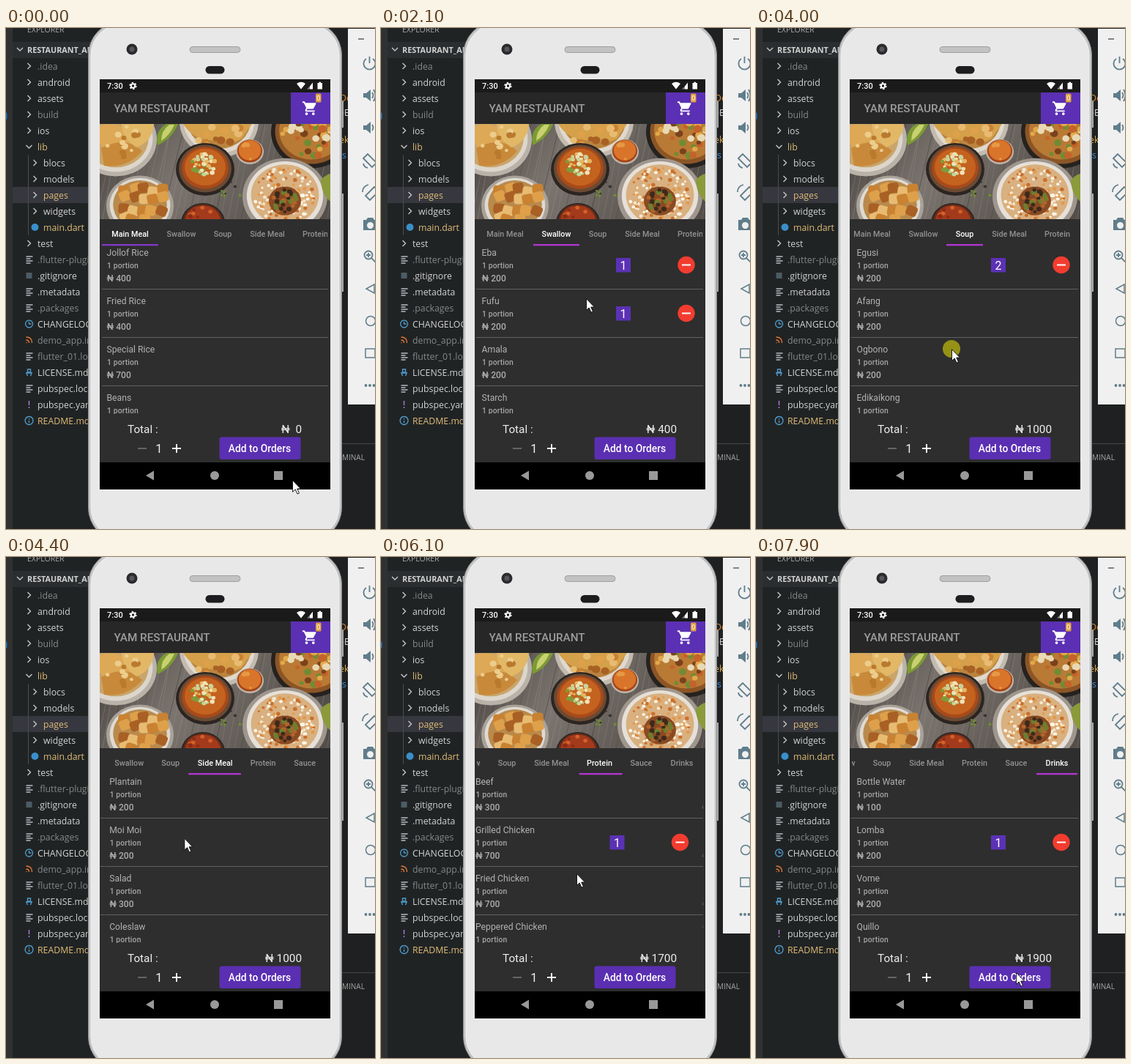
Write an HTML page that moves like this. It is 504x684 px and loops after 8000 ms.

```html
<!DOCTYPE html>
<html lang="en">
<head>
<meta charset="utf-8">
<title>Restaurant app demo</title>
<style>
html, body { margin: 0; width: 100%; height: 100%; overflow: hidden; background: #1e2021; }
svg { display: block; width: 504px; height: 684px; }
text { font-family: Roboto, Arial, sans-serif; white-space: pre; }
.side text { font: 12.3px "Open Sans", "Noto Sans", sans-serif; }
.tabs text { font-size: 10.8px; font-weight: 500; text-anchor: middle; }
.name { font-size: 12.2px; fill: #b2b2b2; }
.portion { font-size: 10.4px; font-weight: 500; letter-spacing: .1px; fill: #a6a6a6; }
.price { font-size: 12.1px; font-weight: 500; fill: #acacac; }
.badge { font-size: 16px; fill: #fff; text-anchor: middle; }
.bar { font-size: 15.3px; fill: #eee; }
.tools { fill: none; stroke: #607d8b; stroke-width: 1.8; }
.tools .fill { fill: #607d8b; stroke: none; }
</style>
</head>
<body>
<svg viewBox="0 0 504 684">
  <defs>
    <clipPath id="photoClip"><path d="M128 131h315v130H128z"/></clipPath>
    <clipPath id="tabClip"><path d="M131 262h308v37H131z"/></clipPath>
    <clipPath id="listClip"><path d="M129 299h311v228H129z"/></clipPath>
    <linearGradient id="wood" x2="1" y2=".25">
      <stop stop-color="#46413e"/><stop offset=".45" stop-color="#7c756f"/><stop offset="1" stop-color="#544e4a"/>
    </linearGradient>
  </defs>

  <!-- editor -->
  <rect width="504" height="684" fill="#1e2021"/>
  <rect x="9" width="110" height="684" fill="#202324"/>
  <rect width="9" height="684" fill="#303131"/>
  <path d="M0 115a1.500 5 0 0 1 0 10" fill="#1f78c8"/>
  <rect x="9" y="19" width="110" height="22" fill="#2b2e30"/>
  <rect x="9" y="217" width="110" height="22" fill="#37373f"/>
  <path d="M30.500 173v110" stroke="#4b4d4e"/>
  <g id="side" class="side"></g>
  <g class="side">
    <text x="456" y="100" fill="#d98b3a">De</text>
    <text x="455" y="120" fill="#ddd">eE</text>
    <text x="455" y="157" fill="#e0b050">ek</text>
    <text x="459" y="178" fill="#3f8fd8">s</text>
    <path d="M456 567.500h48" stroke="#454748"/>
    <text x="459" y="590" fill="#a5a5a5" style="font-size:10px">MINAL</text>
  </g>

  <!-- emulator toolbar -->
  <path d="M467 1h37v513h-37z" fill="#f0f0f0"/>
  <g class="tools">
    <path d="M481 15h8" stroke="#777"/>
    <path d="M492 42a8 8 0 1 0 9 0M496.500 39v9"/>
    <path class="fill" d="M488 89h4l6-5v16l-6-5h-4zM488 133h4l6-5v16l-6-5h-4z"/>
    <path d="M500 88q3 4 0 8M502 84q5 8 0 16M500 132q3 4 0 8"/>
    <path d="M488 178l6-6 12 12-6 6zM488 185q1 5 6 6M503 217l-12 12 6 6 12-12zM487 224q0-8 8-10"/>
    <path class="fill" fill-rule="evenodd" d="M488 262h4l2-3h7l2 3h3v14h-18zM497.500 265a4.500 4.500 0 1 0 .1 0z"/>
    <circle cx="495" cy="310" r="5.500"/><path d="M499 314l6 6M492 310h6M495 307v6"/>
    <g stroke-width="1.500">
      <path d="M503 350v12l-11-6zM491 438h13v12h-13z"/><circle cx="498" cy="400" r="6.500"/>
    </g>
    <path d="M491.500 488h12" stroke-width="3.800" stroke-linecap="round" stroke-dasharray="0 5.500"/>
  </g>

  <!-- phone -->
  <path d="M457 100h4v36h-4zM457 226h4v134h-4z" fill="#aaa"/>
  <rect x="112.500" y="-9" width="346" height="710" rx="46" fill="#c4c4c4" stroke="#8e8e8e"/>
  <rect x="116" y="-5.500" width="339" height="703" rx="43" fill="#e9e8e8" stroke="#f2f2f2"/>
  <circle cx="172" cy="29" r="7.500" fill="#2b2b2d"/><circle cx="172" cy="29" r="3.500" fill="#55575c"/>
  <rect x="251" y="25.500" width="69" height="8" rx="4" fill="#c2c2c2" stroke="#9f9f9f"/>
  <rect x="272.500" y="52" width="26" height="10.500" rx="5.200" fill="#1d1d1f"/>
  <rect x="128" y="70" width="315" height="560" fill="#2e2e2e"/>
  <rect x="128" y="70" width="315" height="18" fill="#1a1a1a"/>
  <rect x="128" y="88" width="315" height="43" fill="#272727"/>
  <text x="138" y="83" font-size="11" font-weight="500" fill="#fff">7:30</text>
  <circle cx="173.500" cy="79" r="2.700" fill="none" stroke="#fff" stroke-width="2"/>
  <circle cx="173.500" cy="79" r="4.400" fill="none" stroke="#fff" stroke-width="1.500" stroke-dasharray="2.300"/>
  <path d="M397 76q6-4.500 12 0l-6 7.500zM419 74.500v9h-4v-4zM425.500 75h2v-1.200h2.500V75h2v8.500h-6.500z" fill="#fff"/>
  <path d="M411 83.500l4-4v4z" fill="#888"/>
  <text x="147.500" y="115" font-size="15.300" font-weight="500" fill="#9c9c9c">YAM RESTAURANT</text>
  <rect x="389" y="88" width="54" height="43" fill="#5b30b4"/>
  <path transform="translate(404 98.500) scale(.93)" fill="#fff" d="M7 18a2 2 0 1 0 .01 0zM1 2v2h2l3.600 7.600-1.350 2.450A2 2 0 0 0 7 17h12v-2H7.420q-.3-.1-.2-.4l.9-1.600h7.450a2 2 0 0 0 1.750-1l3.580-6.500A1 1 0 0 0 20 4H5.210l-.94-2zM17 18a2 2 0 1 0 .01 0z"/>
  <rect x="423" y="89.500" width="7.500" height="12" rx="1.500" fill="#e0a040"/>
  <text x="426.700" y="99" font-size="9" fill="#fff" text-anchor="middle">0</text>

  <g id="photo" clip-path="url(#photoClip)"></g>
  <g class="tabs" clip-path="url(#tabClip)"><g id="tabs"><rect id="line" y="295" height="2.300"/></g></g>
  <g clip-path="url(#listClip)"><g id="pages"></g></g>

  <text class="bar" x="166" y="552.500">Total :</text>
  <text class="bar" id="total" x="404" y="552.500" text-anchor="end"></text>
  <path d="M180 574h12" stroke="#777" stroke-width="1.500"/>
  <text x="209" y="579.500" font-size="16.500" fill="#f2f2f2" text-anchor="middle">1</text>
  <path d="M227 574h12M233 568v12" stroke="#fff" stroke-width="1.800"/>
  <rect x="291.500" y="558.500" width="111" height="30.500" rx="3" fill="#5a2fb2"/>
  <text x="346.500" y="579" font-size="13.800" font-weight="500" fill="#fff" text-anchor="middle">Add to Orders</text>
  <rect x="128" y="593" width="315" height="37" fill="#000"/>
  <path d="M202 604.500v13l-11-6.500zM366 605h12v12h-12z" fill="#999"/>
  <circle cx="285" cy="611" r="6" fill="#999"/>

  <g id="cursor">
    <circle id="press" r="12" fill="#a29d14" opacity=".9"/>
    <path transform="scale(1.05)" d="M.5.6v15l3.500-3.300 2.600 5.900 2.400-1-2.600-5.700h4.500z" fill="#fff" stroke="#111" stroke-width=".9"/>
  </g>
</svg>
<script>
const $ = id => document.getElementById(id);
function el(parent, tag, attrs, text) {
  const node = document.createElementNS('http://www.w3.org/2000/svg', tag);
  for (const k in attrs) node.setAttribute(k, attrs[k]);
  if (text) node.textContent = text;
  parent.appendChild(node);
  return node;
}

// ---- file tree: name, icon, colour, depth
const grey = '#858788', pale = '#d2d2d2', gold = '#dfbd78', blue = '#4f9ac9';
const files = [
  ['.idea', 'dir', grey], ['android', 'dir'], ['assets', 'dir'], ['build', 'dir', grey],
  ['ios', 'dir'], ['lib', 'open', gold], ['blocs', 'dir', pale, 1], ['models', 'dir', pale, 1],
  ['pages', 'dir', gold, 1], ['widgets', 'dir', pale, 1], ['main.dart', 'dart', gold, 1], ['test', 'dir'],
  ['.flutter-plugins', 'lines', grey], ['.gitignore', 'git'], ['.metadata', 'lines'],
  ['.packages', 'lines', grey], ['CHANGELOG.md', 'clock'], ['demo_app.iml', 'feed', grey],
  ['flutter_01.log', 'lines', grey], ['LICENSE.md', 'ribbon'], ['pubspec.lock', 'lines'],
  ['pubspec.yaml', 'bang'], ['README.md', 'info', gold]
];
const icons = {
  dir: ['M-2-4l4 4-4 4', '#c5c5c5'], open: ['M-4-2l4 4 4-4', '#c5c5c5'],
  lines: ['M-4-4h9M-4-1h6M-4 2h9M-4 5h6', '#b5bcc0'],
  clock: ['M0-5a5 5 0 1 0 .1 0M0-3v3h3', blue],
  feed: ['M-4-4q8 0 8 8M-4 0q4 0 4 4M-4 3.500h1', '#e37933'],
  ribbon: ['M-2-4h4v4h-4zM-4 0l2 5M4 0l-2 5M-4 1h8', blue],
  bang: ['M0-5v6M0 3v2', '#b07ad8'],
  info: ['M0-5.500a5.500 5.500 0 1 0 .1 0M0-3v1.500M0 0v3', blue]
};
const side = $('side');
function icon(kind, x, y) {
  if (kind === 'dart') return el(side, 'circle', { cx: x, cy: y, r: 5, fill: '#3a8fc9' });
  if (kind === 'git') return el(side, 'rect', { x: x - 4, y: y - 4, width: 8, height: 8, fill: '#4d5c64' });
  const [d, stroke] = icons[kind];
  el(side, 'path', { d, stroke, fill: 'none', 'stroke-width': 1.4, transform: `translate(${x} ${y})` });
}
el(side, 'text', { x: 29, y: 6, fill: '#a9a9a9', style: 'font-size:10.5px' }, 'EXPLORER');
el(side, 'text', { x: 29, y: 34, fill: '#d4d4d4', style: 'font-size:10.8px;font-weight:700' }, 'RESTAURANT_APP');
icon('open', 19, 29);
files.forEach(([name, kind, fill = pale, deep = 0], i) => {
  const y = 52 + i * 22;
  icon(kind, 31.5 + deep * 8, y);
  el(side, 'text', { x: 43 + deep * 8, y: y + 4.5, fill }, name);
});

// ---- food photo in flat shapes
const photo = $('photo');
let seed = 7;
const rnd = () => (seed = seed * 16807 % 2147483647) / 2147483647;
const disc = (cx, cy, r, fill) => el(photo, 'ellipse', { cx, cy, rx: r, ry: r * .9, fill });
const shape = (d, fill) => el(photo, 'path', { d, fill });
function scatter(x, y, r, n, size, colors) {
  for (let i = 0; i < n; i++) {
    const a = rnd() * 6.283, q = r * Math.sqrt(rnd());
    disc(x + q * Math.cos(a), y + q * .9 * Math.sin(a), size * (.6 + rnd() * .6), colors[i % colors.length]);
  }
}
// rings run from the rim inwards, each a little smaller
function dish(x, y, r, rings, n, size, colors) {
  rings.forEach((c, i) => disc(x, y - i, r * (1 - i * .1), c));
  scatter(x, y - 2, r * .72, n, size, colors);
}
shape('M128 131h315v130H128z', 'url(#wood)');
for (let i = 0; i < 40; i++)
  el(photo, 'path', { d: `M${105 + i * 9} 261l${20 + rnd() * 12}-130`, stroke: i % 4 ? '#99928b' : '#2f2b29', opacity: .2 + rnd() * .3 });
const fried = ['#c98231', '#dea04a', '#a96024', '#e8bb72'];
dish(150, 152, 56, ['#b9b2a8', '#dcd6cc', '#c9a56c'], 0);
shape('M128 134q28-10 50 18l-26 16q-18-2-24-10z', '#dda957');
shape('M130 164q34-18 56 4-20 24-52 20z', '#c88a3a');
shape('M158 131h44q-2 24-24 32-20-14-20-32z', '#e2b867');
scatter(158, 156, 26, 14, 4, ['#edcd8d', '#b97a2e']);
shape('M207 160q-4-20 12-29h16q-8 20-28 29z', '#7c9a34');
shape('M212 154q0-14 11-22h7q-6 14-18 22z', '#c9d070');
dish(291, 128, 54, ['#c3bbb0', '#e0d9cd', '#b98440'], 0);
shape('M242 131h94l-14 20q-16 10-30 2-34 4-50-22z', '#d5a04a');
scatter(288, 138, 32, 16, 5, fried);
dish(417, 142, 55, ['#25221f', '#8b5526', '#b97a35'], 60, 5, ['#e2a94a', '#c4622a', '#e8d9b4', '#6f8c34', '#7a421c']);
dish(333, 169, 19, ['#bfb6ab', '#a54418', '#d9752a'], 4, 3, ['#e59a45']);
dish(272, 193, 40, ['#2b2522', '#6b4a33', '#a84a1a', '#c4621f'], 0);
scatter(270, 187, 17, 46, 2.8, ['#efe2b8', '#7f9b3a', '#e4b660', '#c9d39a']);
dish(183, 243, 46, ['#a9a299', '#dfdad2', '#b98a4c'], 0);
for (let i = 0; i < 18; i++) {
  const x = 152 + i % 5 * 13 + rnd() * 5, y = 212 + (i / 5 | 0) * 13 + rnd() * 4;
  el(photo, 'rect', { x, y, width: 15, height: 14, rx: 4, fill: fried[i % 4], transform: `rotate(${rnd() * 50 - 25} ${x} ${y})` });
}
dish(269, 266, 30, ['#2d2825', '#6b2c18', '#a43a1c'], 14, 3, ['#d2622a', '#8b2c16']);
dish(381, 230, 58, ['#9f978e', '#e6e0d8', '#d9b080'], 150, 2.4, ['#f4e6cf', '#e39a4d', '#fff6e6', '#c9702e']);
disc(381, 236, 22, '#8a4a22');
scatter(381, 236, 18, 34, 3.4, ['#3d2a1c', '#b2642c', '#6d7f30']);
scatter(310, 222, 18, 9, 2, ['#6f8c34', '#3b332c']);
shape('M430 207q9-8 13-8v38q-12-10-13-30z', '#8b9a3a');

// ---- menu pages; each name carries its price
const menu = [
  ['Main Meal', 'Jollof Rice 400', 'Fried Rice 400', 'Special Rice 700', 'Beans 300'],
  ['Swallow', 'Eba 200', 'Fufu 200', 'Amala 200', 'Starch 200'],
  ['Soup', 'Egusi 200', 'Afang 200', 'Ogbono 200', 'Edikaikong 200'],
  ['Side Meal', 'Plantain 200', 'Moi Moi 200', 'Salad 300', 'Coleslaw 300'],
  ['Protein', 'Beef 300', 'Grilled Chicken 700', 'Fried Chicken 700', 'Peppered Chicken 700'],
  ['Sauce', 'Pepper Sauce 200', 'Egg Sauce 300', 'Fish Sauce 300', 'Garden Sauce 300'],
  ['Drinks', 'Bottle Water 100', 'Lomba 200', 'Vome 200', 'Quillo 200']
];
const edges = [131, 208, 271, 321, 393, 452, 507, 563];
const centers = menu.map((_, i) => (edges[i] + edges[i + 1]) / 2);
// the chosen tab is centred as far as the strip can scroll
const scrolls = centers.map(c => Math.min(Math.max(c - 285, 0), edges[7] - 439));
const pageW = 310, rowH = 66, dishes = {}, labels = [];

menu.forEach(([tab, ...items], p) => {
  labels.push(el($('tabs'), 'text', { x: centers[p], y: 284.5 }, tab));
  const page = el($('pages'), 'g', { transform: `translate(${p * pageW} 0)` });
  items.forEach((item, r) => {
    const row = el(page, 'g', { transform: `translate(0 ${r * rowH})` });
    const [, name, price] = item.match(/(.+) (\d+)/);
    el(row, 'text', { class: 'name', x: 137.5, y: 310.5 }, name);
    el(row, 'text', { class: 'portion', x: 138, y: 327.5 }, '1 portion');
    el(row, 'text', { class: 'price', x: 137.5, y: 345.5 }, '₦ ' + price);
    el(row, 'path', { d: 'M131 356.500h309.500', stroke: '#616161' });
    const mark = el(row, 'g');
    el(mark, 'rect', { x: 321, y: 314, width: 20, height: 19.5, fill: '#5b32b5' });
    const count = el(mark, 'text', { class: 'badge', x: 331, y: 329.5 });
    el(mark, 'circle', { cx: 417, cy: 323.5, r: 11.7, fill: '#f23c30' });
    el(mark, 'path', { d: 'M411 323.500h12', stroke: '#fff', 'stroke-width': 2 });
    dishes[name] = { mark, count, price: +price };
  });
});

// ---- timeline in ms
const loop = 8000, step = 100;
const tabTaps = [950, 4690], drags = [2700, 4080, 6098, 6550];
const orders = [[1600, 'Eba'], [2000, 'Fufu'], [2300, 'Fufu'], [3700, 'Egusi'], [3900, 'Egusi'], [5800, 'Grilled Chicken'], [7500, 'Lomba']];
// pointer stops: arrival, x, y
const stops = [
  [0, 391, 617], [200, 254, 348], [700, 240, 278], [1300, 285, 313], [1800, 280, 369],
  [2700, 300, 447], [2800, 228, 447], [3400, 262, 330], [4000, 267, 438], [4200, 190, 434],
  [4600, 350, 283], [5000, 320, 331], [5300, 292, 384], [6100, 267, 432], [6300, 190, 430],
  [6500, 278, 430], [7200, 276, 375], [7900, 355, 567]
];

// a move takes up to 300 ms and ends on its stop
function pointer(t) {
  const n = stops.findIndex(s => s[0] >= t);
  if (n < 1) return stops[n].slice(1);
  const [t0, x0, y0] = stops[n - 1], [t1, x1, y1] = stops[n];
  const u = Math.max(0, 1 - (t1 - t) / Math.min(300, t1 - t0));
  return [x0 + (x1 - x0) * u, y0 + (y1 - y0) * u];
}
// every turn glides one page on and settles exponentially
const pageAt = t => [...tabTaps, ...drags].reduce((p, s) => p + (t > s ? 1 - Math.exp((s - t) / 72) : 0), 0);

function draw(t) {
  const p = pageAt(t), lo = Math.floor(p), f = p - lo;
  const mix = list => list[lo] + ((list[lo + 1] ?? list[lo]) - list[lo]) * f;
  const left = mix(edges), right = mix(edges.slice(1));
  $('tabs').setAttribute('transform', `translate(${-mix(scrolls)} 0)`);
  $('line').setAttribute('x', left);
  $('line').setAttribute('width', right - left);
  $('line').setAttribute('fill', p ? '#b236d2' : '#8139c6');
  labels.forEach((label, i) => {
    const c = Math.round(146 + 109 * Math.max(0, 1 - Math.abs(p - i)));
    label.setAttribute('fill', `rgb(${c},${c},${c})`);
  });
  $('pages').setAttribute('transform', `translate(${-p * pageW} 0)`);

  const done = orders.filter(o => o[0] <= t).map(o => o[1]);
  for (const name in dishes) {
    const n = done.filter(d => d === name).length;
    dishes[name].mark.setAttribute('visibility', n ? 'visible' : 'hidden');
    dishes[name].count.textContent = n;
  }
  const total = done.reduce((sum, name) => sum + dishes[name].price, 0);
  $('total').textContent = total ? '₦ ' + total : '₦  0';

  const pressed = [...orders.map(o => o[0]), ...drags].some(s => s > t && s <= t + step);
  $('cursor').setAttribute('transform', `translate(${pointer(t)})`);
  $('press').setAttribute('visibility', pressed ? 'visible' : 'hidden');
}

const start = performance.now();
function tick() {
  const t = Math.max(0, performance.now() - start) % loop;
  draw(Math.floor(t / step) * step);
  requestAnimationFrame(tick);
}
tick();
</script>
</body>
</html>
```
